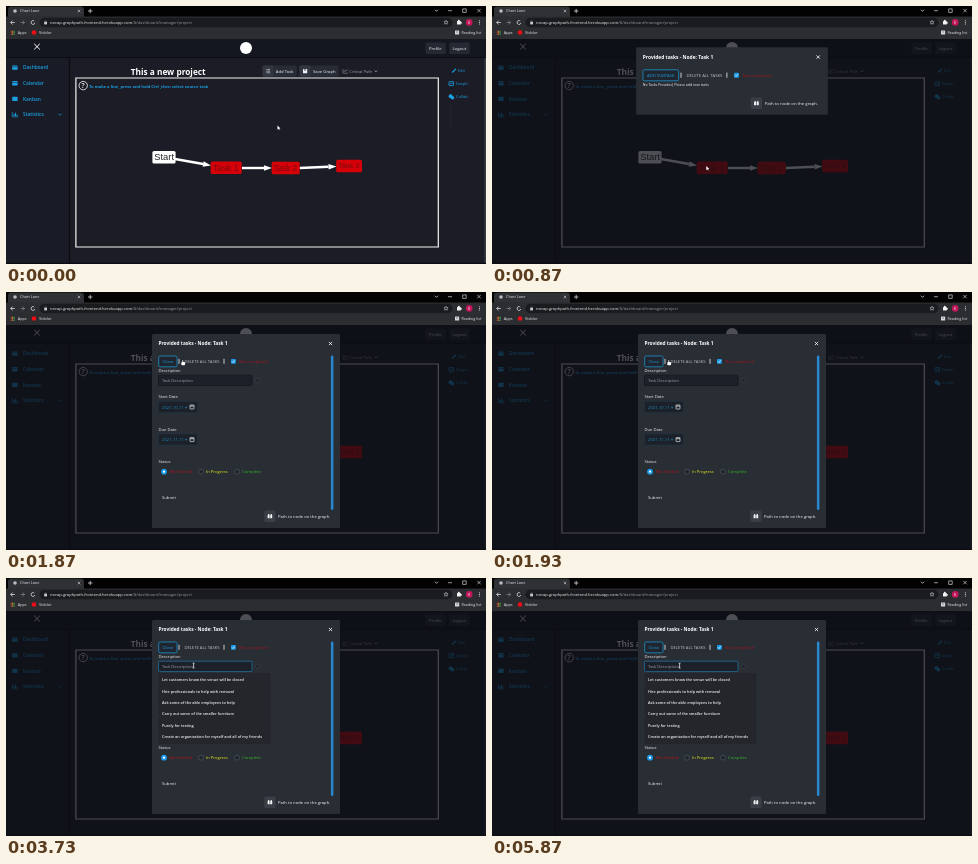
Recreate the animation shown at these times as an HTML page with a canvas. Size 480 by 258 pixels, loop 6.07 s.

```html
<!DOCTYPE html>
<html lang="en">
<head>
<meta charset="utf-8">
<title>Project planner</title>
<style>
html, body { margin: 0; width: 100%; height: 100%; overflow: hidden; background: #000; }
canvas { display: block; width: 480px; height: 258px; }
</style>
</head>
<body>
<canvas id="stage"></canvas>
<script>
const W = 480, H = 258, LOOP = 6070, STEP = 1000 / 15;
const CYAN = '#1b9fe0', WHITE = '#f2f3f5', GREY = '#9aa0a6';
const canvas = document.getElementById('stage');
const ctx = canvas.getContext('2d');
const dpr = window.devicePixelRatio || 1;
canvas.width = W * dpr;
canvas.height = H * dpr;

function box(x, y, w, h, fill, stroke, r = 0, lw = 0.6) {
  ctx.beginPath();
  ctx.roundRect(x, y, w, h, r);
  if (fill) { ctx.fillStyle = fill; ctx.fill(); }
  if (stroke) { ctx.strokeStyle = stroke; ctx.lineWidth = lw; ctx.stroke(); }
}

function dot(x, y, r, fill, stroke, lw = 0.6) {
  ctx.beginPath();
  ctx.arc(x, y, r, 0, Math.PI * 2);
  if (fill) { ctx.fillStyle = fill; ctx.fill(); }
  if (stroke) { ctx.strokeStyle = stroke; ctx.lineWidth = lw; ctx.stroke(); }
}

function path(points, color, lw = 0.8, filled = false) {
  ctx.beginPath();
  points.forEach(([x, y]) => ctx.lineTo(x, y));
  if (filled) { ctx.closePath(); ctx.fillStyle = color; ctx.fill(); }
  else { ctx.strokeStyle = color; ctx.lineWidth = lw; ctx.stroke(); }
}

// Text is placed by its left edge and vertical middle.
function label(str, x, y, size, color, weight = 500, family = '"Open Sans", sans-serif') {
  ctx.font = `${weight} ${size}px ${family}`;
  ctx.fillStyle = color;
  ctx.fillText(str, x, y + size * 0.36);
  return x + ctx.measureText(str).width;
}

function cross(x, y, s, color, lw = 0.8) {
  path([[x - s, y - s], [x + s, y + s]], color, lw);
  path([[x + s, y - s], [x - s, y + s]], color, lw);
}

function chevron(x, y, s, color) {
  path([[x - s, y - s / 2], [x, y + s / 2], [x + s, y - s / 2]], color, 0.7);
}

function star(x, y, r, color) {
  const pts = [];
  for (let i = 0; i <= 10; i++) {
    const a = -Math.PI / 2 + i * Math.PI / 5, d = i % 2 ? r * 0.45 : r;
    pts.push([x + d * Math.cos(a), y + d * Math.sin(a)]);
  }
  path(pts, color, 0.5);
}

function drawBrowser() {
  box(0, 0, W, 11, '#020203');
  box(2, 0.5, 76, 14, '#303135', null, 3);
  box(0, 10.5, W, 22.5, '#2c2d30');
  dot(9, 5, 1.8, '#b9bbc0');
  label('Chart Lane', 14, 5.1, 3.8, '#e8eaed');
  cross(73, 5, 1.3, '#d5d6d9', 0.6);
  path([[82, 5], [86.4, 5]], WHITE, 0.7);
  path([[84.2, 2.8], [84.2, 7.2]], WHITE, 0.7);
  chevron(430.5, 4.5, 1.6, WHITE);
  path([[442, 4.7], [446, 4.7]], WHITE, 0.6);
  box(456.7, 2.9, 3.5, 3.5, null, WHITE, 0, 0.6);
  cross(473, 4.6, 1.7, WHITE, 0.6);

  path([[8.8, 16.5], [4.7, 16.5]], WHITE, 0.7);
  path([[6.6, 14.6], [4.7, 16.5], [6.6, 18.4]], WHITE, 0.7);
  path([[14.5, 16.5], [18.6, 16.5]], '#8a8c91', 0.7);
  path([[16.7, 14.6], [18.6, 16.5], [16.7, 18.4]], '#8a8c91', 0.7);
  ctx.beginPath();
  ctx.arc(27, 16.5, 1.9, 0.3, 5.4);
  ctx.strokeStyle = WHITE;
  ctx.stroke();
  box(33.5, 11.8, 413, 9.4, '#1a1b1e', null, 4.7);
  box(38.2, 16, 2.8, 2.4, '#c8cace');
  dot(39.6, 15.8, 0.9, null, '#c8cace', 0.5);
  const end = label('nocap-graphpath-frontend.herokuapp.com', 44, 16.4, 4.1, '#eceef0');
  label('/#/dashboard/manager/project', end, 16.4, 4.1, '#94979d');
  star(440, 16.4, 2.2, '#dcdde0');
  box(451, 15, 3.8, 3.6, WHITE, null, 0.5);
  dot(452.8, 14.8, 1, WHITE);
  dot(455, 16.8, 0.9, WHITE);
  dot(463.2, 16.4, 3.3, '#c2185b');
  label('K', 462.1, 16.4, 3.4, '#fff');
  [-1.6, 0, 1.6].forEach(d => dot(473.4, 16.4 + d, 0.5, WHITE));

  const dots = ['#e8453c', '#f9bb2d', '#3aa757'];
  for (let i = 0; i < 9; i++)
    box(4.8 + (i % 3) * 1.5, 24.7 + Math.floor(i / 3) * 1.5, 1, 1, dots[i % 3]);
  label('Apps', 11.8, 26.6, 3.8, '#e8eaed');
  dot(28, 26.5, 2.3, '#f00d17');
  label('Vidolor', 33, 26.6, 3.8, '#e8eaed');
  box(449, 24.5, 4.2, 4, '#d6d8dc', null, 0.5);
  path([[450, 26], [452.2, 26]], '#333', 0.5);
  label('Reading list', 455.5, 26.6, 3.7, '#e8eaed');
}

function drawSidebar() {
  box(0, 52, 63, H - 52, '#191c26');
  path([[63.5, 52], [63.5, H]], '#0b0c11', 1.2);
  const items = ['Dashboard', 'Calendar', 'Kanban', 'Statistics'];
  items.forEach((name, i) => {
    const y = 61.6 + i * 15.65;
    if (i === 3) {
      path([[6.3, y - 2.5], [6.3, y + 2.3], [12, y + 2.3]], CYAN, 0.7);
      [2, 3.4, 1.6].forEach((h, k) => box(7.4 + k * 1.6, y + 1.5 - h, 1, h, CYAN));
    } else {
      box(6.2, y - 2.2, 5.4, 4.4, CYAN, null, 0.6);
      if (i < 2) path([[6.2, y - 0.8], [11.6, y - 0.8]], '#191c26', 0.5);
    }
    label(name, 17, y, 4.8, CYAN, 600);
  });
  chevron(54, 108.5, 1.6, CYAN);
}

function drawTools() {
  label('This a new project', 124.7, 65.6, 8.3, '#fff', 700);
  box(256.5, 59.5, 34.3, 11.3, '#282c36', null, 1.5);
  box(256.5, 59.5, 11, 11.3, '#313641', null, 1.5);
  [-1.6, 0, 1.6].forEach(d => {
    dot(260.2, 65.2 + d, 0.4, WHITE);
    path([[261.2, 65.2 + d], [264, 65.2 + d]], WHITE, 0.6);
  });
  label('Add Task', 269.8, 65.2, 4.25, WHITE);
  box(293.5, 59.5, 39, 11.3, '#282c36', null, 1.5);
  box(293.5, 59.5, 11, 11.3, '#313641', null, 1.5);
  box(297, 63, 4.2, 4.3, WHITE, null, 0.5);
  box(298, 63.4, 2, 1.2, '#313641');
  label('Save Graph', 307, 65.2, 4.25, WHITE);
  path([[337, 63], [337, 67.2], [342, 67.2]], GREY, 0.5);
  path([[337.8, 66], [339, 64.3], [340, 65.2], [341.6, 63.3]], GREY, 0.5);
  label('Critical Path', 343.3, 65.2, 4.1, '#a2a6ad');
  chevron(370, 65.2, 1.4, '#b8bbc0');

  path([[444.5, 97], [444.5, 126]], '#252b36', 0.5);
  path([[446.2, 66.5], [449.8, 62.9]], CYAN, 1.3);
  label('Edit', 451.8, 64.8, 4.1, CYAN);
  box(443, 75.6, 4.5, 4, null, CYAN, 0.4, 0.8);
  path([[443.8, 78.6], [445, 77], [446, 78], [447, 76.5]], CYAN, 0.6);
  label('Graph', 449.8, 77.6, 4.1, CYAN);
  dot(444.6, 90.3, 2, CYAN);
  dot(446.5, 91.7, 1.8, CYAN);
  label('Collab', 449.8, 91, 4.1, CYAN);
}

function edge(x1, y1, x2, y2) {
  const a = Math.atan2(y2 - y1, x2 - x1), c = Math.cos(a), s = Math.sin(a);
  const bx = x2 - 8 * c, by = y2 - 8 * s;
  path([[x1, y1], [bx, by]], '#fff', 2.4);
  path([[x2, y2], [bx - 2.7 * s, by + 2.7 * c], [bx + 2.7 * s, by - 2.7 * c]], '#fff', 0, true);
}

function drawChart() {
  box(69.9, 72, 362.4, 169, '#1b1c25', '#f4f4f4', 0, 1.2);
  dot(77.2, 79.6, 4.2, null, '#fff', 0.8);
  label('?', 75.4, 79.6, 6.8, '#fff', 600);
  label('To make a line, press and hold Ctrl ,then select source task', 83, 81, 4.1, CYAN, 700);
  edge(169, 153, 205, 159.4);
  edge(236, 162, 266, 162);
  edge(293.5, 162, 330.5, 160.4);
  const arial = '"Liberation Sans", sans-serif';
  box(146.4, 145, 23.2, 12.5, '#fff', null, 1.6);
  label('Start', 148.2, 150.8, 9.4, '#25252a', 400, arial);
  [[204.7, 155.6, 31], [265.7, 155.8, 28], [330.2, 153.8, 25.8]].forEach(([x, y, w], i) => {
    box(x, y, w, 12.5, '#d50008', null, 1.6);
    label('Task ' + (i + 1), x + 1.8, y + 6, (w - 3.6) / 3, '#7c0a10', 400, arial);
  });
}

function drawPage() {
  box(0, 33, W, H - 33, '#1b1c25');
  box(0, 33, W, 18, '#14171f');
  path([[0, 51.5], [W, 51.5]], '#0b0c11', 1.2);
  cross(31, 40.6, 2.8, '#fff', 1);
  dot(240, 42, 6, '#fff');
  box(419.5, 36.6, 20.3, 11.3, '#242934', null, 1.5);
  label('Profile', 422.9, 42.2, 4.25, WHITE);
  box(443.2, 36.6, 20.6, 11.3, '#242934', null, 1.5);
  label('Logout', 446.4, 42.2, 4.25, WHITE);
  drawSidebar();
  drawTools();
  drawChart();
  box(478.4, 52, 1.6, H - 52, '#3a3b42');
  box(0, 256.8, W, 1.2, '#0b0c11');
}

function pathButton(y) {
  box(258.3, y - 5.7, 11.2, 11.4, '#3a3e47', null, 1.5);
  [262.6, 265.2].forEach(x => {
    box(x - 1, y - 1.2, 2, 3.2, WHITE, null, 0.5);
    box(x - 0.5, y - 2.3, 1.2, 1.2, WHITE);
  });
  label('Path to node on the graph.', 272, y, 4.2, WHITE);
}

function toolbarRow(open) {
  const dx = open ? -17 : 0;
  box(152.7, 64, open ? 18.3 : 35, 10.8, '#20262f', CYAN, 1.5, 0.7);
  label(open ? 'Close' : 'ADD SUBTASK', 156.6, 69.5, 4.15, CYAN);
  [190, 235].forEach(x => path([[x + dx, 66.8], [x + dx, 71.8]], WHITE, 0.8));
  label('DELETE ALL TASKS', 195.4 + dx, 69.5, 4.15, '#c3c6cb');
  box(242 + dx, 67, 4.8, 4.8, '#1c9bea', null, 0.8);
  path([[243.1 + dx, 69.5], [244 + dx, 70.5], [245.8 + dx, 68.3]], '#fff', 0.7);
  label('Not completed', 250.2 + dx, 69.5, 4.15, '#a3151c');
}

function dateField(title, value, y) {
  label(title, 152.5, y, 4.15, WHITE);
  box(152.7, y + 4.8, 38.6, 11, '#1c2129', '#1d3443', 1);
  ctx.save();
  ctx.beginPath();
  ctx.rect(153, y + 5, 29, 11);
  ctx.clip();
  label(value, 156, y + 10.4, 4.2, '#1887b8');
  ctx.restore();
  box(184, y + 8.4, 4, 4, null, '#dfe1e4', 0.3, 0.7);
  path([[184, y + 9.5], [188, y + 9.5]], '#dfe1e4', 0.8);
}

function drawForm(t) {
  const focused = t >= 3130;
  label('Description', 152.5, 78.6, 4.15, WHITE);
  box(152.5, 83.2, 93.5, 10.4, '#1c2129', focused ? '#1f6f9f' : '#14181e', 1, 0.8);
  label('Task Description', 156, 88.4, 4.05, '#9a9ea6');
  dot(251.5, 88.5, 2.4, '#22262d', '#454b54', 0.5);

  dateField('Start Date', '2021-10-11 ▾', 104.6);
  dateField('Due Date', '2021-11-11 ▾', 137.2);
  label('Status', 152.5, 170, 4.15, WHITE);
  dot(158, 179.7, 2.9, '#1c9bea');
  dot(158, 179.7, 1.1, '#fff');
  dot(195, 179.7, 2.5, '#20252c', '#58606b', 0.6);
  dot(231, 179.7, 2.5, '#20252c', '#58606b', 0.6);
  label('Not Started', 163.8, 179.8, 4.2, '#b3141a');
  label('In Progress', 200, 179.8, 4.2, '#e6e81c');
  label('Complete', 236, 179.8, 4.2, '#35b526');
  label('Submit', 156, 205, 4.2, WHITE);
  box(324.9, 63.5, 2.5, 154.5, '#2787cf', null, 1.2);

  if (t >= 3200) drawSuggestions();
  const caretOn = [[3200, 3730], [4200, 4730], [5270, 5800]].some(([a, b]) => t >= a && t < b);
  if (caretOn) box(156, 85.2, 0.7, 6, WHITE);
}

function drawSuggestions() {
  box(152.5, 95, 112, 71, '#25262b', null, 0.8);
  [
    'Let customers know the venue will be closed',
    'Hire professionals to help with removal',
    'Ask some of the able employees to help',
    'Carry out some of the smaller furniture',
    'Purely for testing',
    'Create an organisation for myself and all of my friends'
  ].forEach((s, i) => label(s, 156, 102 + i * 11.3, 3.82, '#f0f1f3', 600));
}

function drawModal(t) {
  const open = t >= 1870, bottom = open ? 236 : 108;
  const scale = t < 930 ? 1.02 : 1;
  ctx.save();
  ctx.translate(240, 75);
  ctx.scale(scale, scale);
  ctx.translate(-240, -75);
  box(146, 42, 188, bottom - 42, '#292d34', null, 1.5);
  label('Provided tasks - Node: Task 1', 152.5, 51.6, 4.8, '#fff', 700);
  cross(324.5, 51.5, 1.6, '#fff', 0.8);
  toolbarRow(open);
  if (open) drawForm(t);
  else label('No Tasks Provided, Please add new tasks', 152.5, 78.6, 3.45, WHITE);
  pathButton(open ? 224.3 : 96.8);
  ctx.restore();
}

// Start time, end time, start point, end point.
const moves = [
  [0, 333, [271.5, 119.5], [214.3, 160]],
  [1000, 1600, [214.3, 160], [176.5, 68]],
  [2200, 2600, [176.5, 68], [187.6, 87.6]]
];

function cursorAt(t) {
  let pos = moves[0][2];
  for (const [a, b, from, to] of moves) {
    if (t < a) break;
    const p = Math.min(1, (t - a) / (b - a)), e = p * p * (3 - 2 * p);
    pos = from.map((v, i) => v + (to[i] - v) * e);
  }
  return pos;
}

function drawCursor(t) {
  const [x, y] = cursorAt(t);
  if (t >= 2530) {
    path([[x, y - 2.4], [x, y + 2.4]], '#fff', 0.7);
    [-2.4, 2.4].forEach(d => path([[x - 1, y + d], [x + 1, y + d]], '#fff', 0.6));
  } else if (t >= 1530) {
    box(x - 0.4, y, 1.1, 3.5, '#fff', '#222', 0.5, 0.3);
    box(x - 1.2, y + 2, 3.8, 3.2, '#fff', null, 1);
  } else {
    path([[x, y], [x, y + 4.2], [x + 1, y + 3.3], [x + 1.7, y + 4.6],
      [x + 2.3, y + 4.3], [x + 1.7, y + 3], [x + 3, y + 2.9]], '#fff', 0, true);
  }
}

function draw(t) {
  ctx.setTransform(dpr, 0, 0, dpr, 0, 0);
  drawPage();
  if (t >= 670) box(0, 33, W, H - 33, `rgba(13,14,21,${t < 730 ? 0.7 : 0.73})`);
  drawBrowser();
  if (t >= 870) drawModal(t);
  drawCursor(t);
}

function tick() {
  const now = performance.now() % LOOP;
  const held = Math.floor((now + 4) / STEP) * STEP;
  draw(Math.ceil(held + 4));
  requestAnimationFrame(tick);
}
tick();
</script>
</body>
</html>
```
